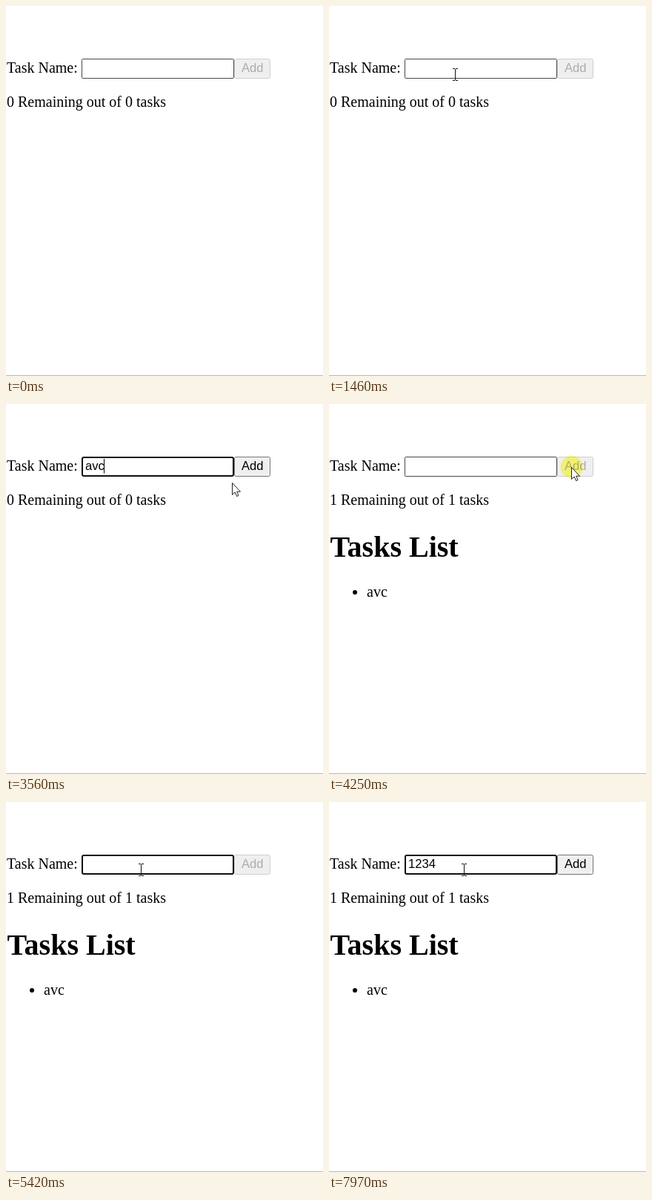
These frames come from a looping animation (428x499 px, 8 s). An HTML page:

```html
<!DOCTYPE html>
<html lang="en">
<head>
<meta charset="utf-8">
<title>Task list</title>
<style>
  html, body { margin: 0; width: 100%; height: 100%; overflow: hidden; background: #fff; }
  svg { display: block; width: 428px; height: 499px; }
  text { font: 20px "Liberation Serif", "Times New Roman", serif; white-space: pre; }
  .title { font-size: 40px; font-weight: bold; }
  .ui { font: 16.667px "Liberation Sans", Arial, sans-serif; }
  .spot { fill: #ffff80; mix-blend-mode: multiply; }
  .off rect { stroke: #cfcfcf; }
  .off text { fill: #acacac; }
</style>
</head>
<body>
<svg viewBox="0 0 428 499">
  <rect y="498" width="428" height="1" fill="#b8b8b8"/>
  <text x="1" y="90">Task Name:</text>
  <rect id="box" x="102.5" y="71.5" width="205" height="26" rx="1" fill="#fff" stroke="#484848"/>
  <g id="add">
    <rect x="308.5" y="71.5" width="48" height="26" rx="2" fill="#efefef" stroke="#767676"/>
    <text class="ui" x="318" y="89">Add</text>
  </g>
  <rect id="ring" x="103" y="72" width="204" height="25" rx="2" fill="#fff" stroke="#101010" stroke-width="2"/>
  <text id="entry" class="ui" x="107" y="89"></text>
  <rect id="caret" y="74" width="1" height="19.5"/>
  <text id="count" x="1" y="136"></text>
  <g id="list">
    <text class="title" x="1.6" y="206">Tasks List</text>
    <circle cx="35" cy="254" r="3"/>
    <text x="51" y="260">avc</text>
  </g>
  <circle id="spot" class="spot" r="15"/>
  <path id="arrow" d="M.5.5V16.5L4.2 13L6.6 18.5L9 17.5L6.7 12.2H11.5Z" fill="#fff" stroke="#222"/>
  <path id="beam" d="M-3 -8H0M1 -8H4M.5 -7.5V7.5M-3 8H0M1 8H4" fill="none" stroke="#111"/>
</svg>
<script>
const LOOP = 8000;
const el = id => document.getElementById(id);

// Each row: start time, value
const typed = [[0, ''], [1920, 'a'], [2640, 'av'], [3100, 'avc'], [4240, ''],
  [6960, '1'], [7110, '12'], [7190, '123'], [7420, '1234']];
const focus = [[0, 0], [610, 1], [1080, 0], [1540, 1], [4090, 0], [4870, 1]];
const blink = [[0, 1], [2470, 0], [2640, 1], [3640, 0], [4870, 1],
  [5420, 0], [5950, 1], [6410, 0], [6960, 1], [7970, 0]];
const tasks = [[0, 0], [4240, 1]];
const press = [[0, 0], [610, 1], [840, 0], [990, 1], [1160, 0], [1540, 1],
  [1690, 0], [4090, 1], [4320, 0], [4870, 1], [4940, 0]];

// Pointer: start time, shape, x, y
const pointer = [[0, '', 0, 0],
  [150, 'arrow', 215, 0], [230, 'arrow', 202, 130], [310, 'arrow', 186, 258],
  [380, 'arrow', 176, 205], [460, 'arrow', 169, 135], [530, 'beam', 166, 88],
  [840, 'beam', 166, 92], [920, 'arrow', 166, 100],
  [1390, 'beam', 170, 92], [1470, 'beam', 174, 85], [1690, 'beam', 174, 86],
  [3180, 'beam', 205, 90], [3260, 'beam', 250, 94], [3330, 'arrow', 285, 100],
  [3410, 'arrow', 302, 103], [3560, 'arrow', 305, 106], [3720, 'arrow', 305, 104],
  [3790, 'arrow', 305, 102], [3940, 'arrow', 315, 94], [4020, 'arrow', 324, 88],
  [4090, 'arrow', 327, 85], [4400, 'arrow', 312, 88], [4480, 'beam', 280, 90],
  [4560, 'beam', 236, 91], [4630, 'beam', 200, 91], [4710, 'beam', 185, 91],
  [4790, 'beam', 182, 91]];

const rowAt = (rows, t) => rows.findLast(row => row[0] <= t);
const valueAt = (rows, t) => rowAt(rows, t)[1];
const show = (id, on) => { el(id).style.display = on ? '' : 'none'; };

function draw(t) {
  const text = valueAt(typed, t);
  const focused = valueAt(focus, t);
  const total = valueAt(tasks, t);
  const [, shape, x, y] = rowAt(pointer, t);

  el('entry').textContent = text;
  const end = text ? el('entry').getComputedTextLength() : 0;
  el('caret').setAttribute('x', Math.max(107, Math.floor(106.5 + end)));
  show('caret', focused && valueAt(blink, t));
  show('ring', focused);
  show('box', !focused);

  el('add').setAttribute('class', text.length < 3 ? 'off' : '');
  el('count').textContent = `${total} Remaining out of ${total} tasks`;
  show('list', total);

  for (const id of ['arrow', 'beam']) {
    show(id, id === shape);
    el(id).setAttribute('transform', `translate(${x} ${y + (id === 'beam' ? .5 : 0)})`);
  }
  show('spot', valueAt(press, t));
  el('spot').setAttribute('cx', x + .5);
  el('spot').setAttribute('cy', shape === 'beam' ? y - 1 : y);
}

const start = performance.now();
function tick() {
  draw((performance.now() - start) % LOOP);
  requestAnimationFrame(tick);
}
tick();
</script>
</body>
</html>
```
